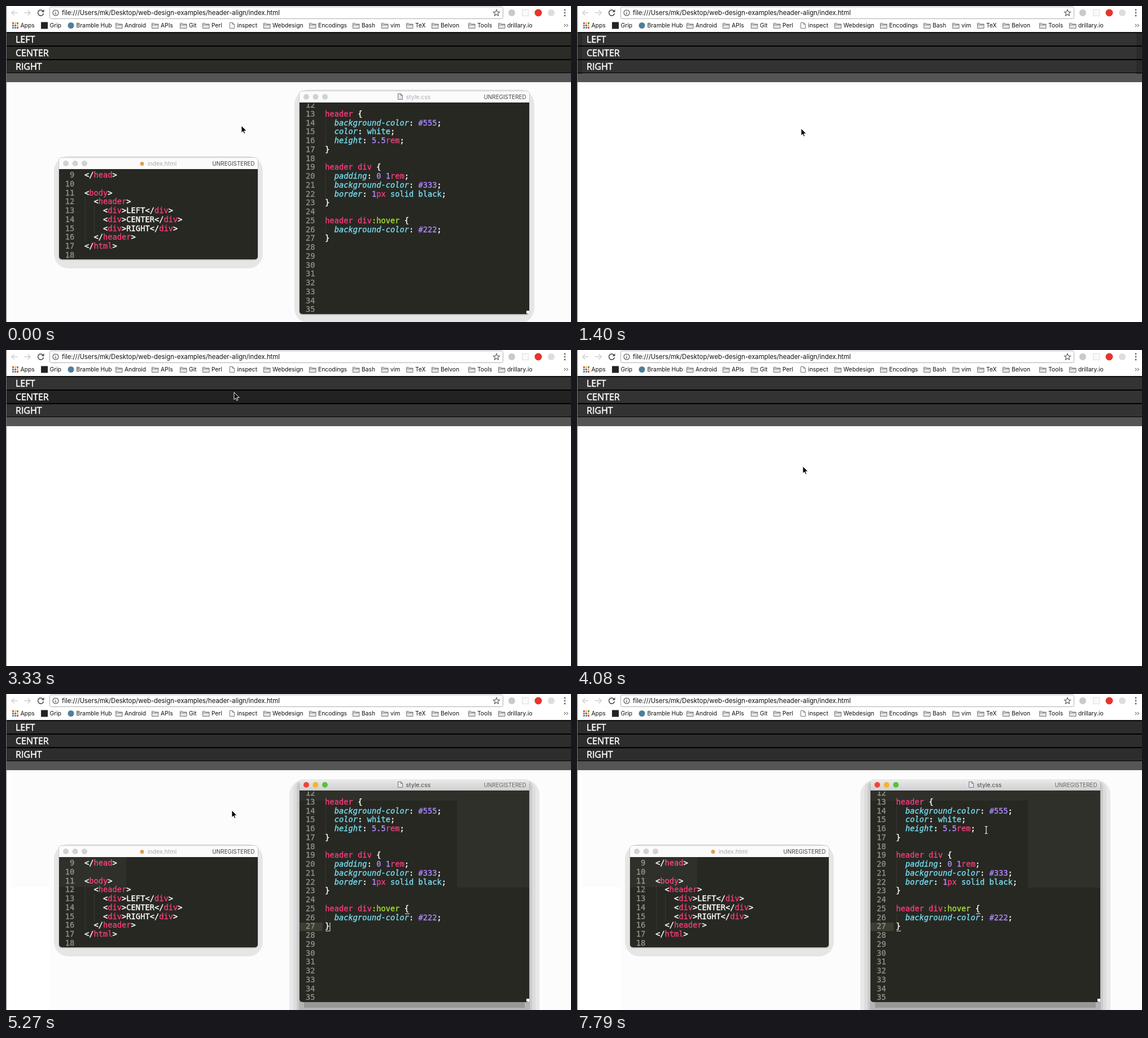
Write an HTML page that moves like this. It is 1001 px wide and 560 px high and loops after 8 s.

```html
<!DOCTYPE html>
<html lang="en">
<head>
<meta charset="utf-8">
<title>Header alignment</title>
<style>
  html, body { margin: 0; width: 100%; height: 100%; overflow: hidden; background: #fff; }
  svg { display: block; width: 1001px; height: 560px; }
  text { white-space: pre; font-family: Inter, Roboto, sans-serif; }
  .row { font: 16px "Open Sans", "Noto Sans", sans-serif; fill: #fff; stroke: #fff; stroke-width: .5px; }
  .code { font: 13.72px "DejaVu Sans Mono", "Liberation Mono", monospace; }
  .code, .code tspan { fill: currentColor; stroke: currentColor; stroke-width: .35px; }
  .n { color: #8f908a; }
  .w { color: #fff; }
  .p { color: #f63c7c; }
  .c, .i { color: #78ddf3; }
  .i { font-style: italic; }
  .v { color: #b08aff; }
  .g { color: #a9e035; }
</style>
</head>
<body>
<svg id="stage" viewBox="0 0 1001 560"></svg>
<script>
const LOOP = 8000, START = 500, STEP = 148.7, PITCH = 15.75;
const HEADER_TOP = 47, ROW = 24;
const WINDOWS_HIDE = 1400, SWITCHER_SHOW = 4680, HAND_SHOW = 5130, WINDOWS_SHOW = 5270;

const rect = (x, y, w, h, fill, more = '') =>
  `<rect x="${x}" y="${y}" width="${w}" height="${h}" fill="${fill}" ${more}/>`;
const dot = (x, y, r, fill) => `<circle cx="${x}" cy="${y}" r="${r}" fill="${fill}"/>`;
const path = (d, fill, stroke = 'none', more = '') =>
  `<path d="${d}" fill="${fill}" stroke="${stroke}" ${more}/>`;
const label = (x, y, size, s, fill = '#111', more = '') =>
  `<text x="${x}" y="${y}" font-size="${size}" fill="${fill}" ${more}>${s}</text>`;
const group = (id, body) => `<g id="${id}">${body}</g>`;

// Browser toolbar and bookmarks
const folder = x => path(`M${x + .5} 30.5h4l1.5 1.5h6v7.500h-11.500z M${x + .5} 33.500h11.500`, '#e4e4e4', '#777');
const page = (x, y, fill = '#fff') => path(`M${x + .5} ${y + .5}h5l3 3v7h-8z M${x + 5.5} ${y + .5}v3h3`, fill, '#777');

function toolbar() {
  const folders = [[194, 'Android'], [258, 'APIs'], [308, 'Git'], [348, 'Perl'], [456, 'Webdesign'],
    [537, 'Encodings'], [614, 'Bash'], [665, 'vim'], [709, 'TeX'], [754, 'Belvon'], [819, 'Tools'], [872, 'drillary.io']];
  const plain = [[25.5, 'Apps'], [77.5, 'Grip'], [124.5, 'Bramble Hub'], [409.5, 'inspect']];
  const colors = ['#e8453c', '#f9bb2d', '#3aa757', '#4688f1'];
  let s = rect(0, 0, 1001, 46, '#fff');
  s += path('M20 12H10M14.500 7.500L10 12l4.500 4.500M32 12h11M38.500 7.500L43 12l-4.500 4.500', 'none', '#d0d0d0', 'stroke-width="1.500"');
  s += path('M65.500 9A5 5 0 1 0 66.500 13', 'none', '#555', 'stroke-width="1.600"') + path('M67.500 6v5h-5z', '#555');
  s += rect(77.500, 1.500, 803, 21, '#fff', 'rx="3" stroke="#b0b0b0"');
  s += path('M93 12a5 5 0 1 0-10 0a5 5 0 1 0 10 0M88 11v4M88 8.500v1.300', 'none', '#555', 'stroke-width="1.200"');
  s += label(99, 16, 11.3, 'file:///Users/mk/Desktop/web-design-examples/header-align/index.html');
  s += path('M869 6.500l1.600 3.700 4 .3-3 2.700.9 3.900-3.500-2.100-3.500 2.100.9-3.900-3-2.700 4-.3z', 'none', '#555', 'stroke-width="1.100"');
  s += dot(896, 12, 6, '#c9c9c9') + rect(914.5, 6.5, 11, 11, '#fafafa', 'stroke="#ddd"');
  s += dot(943, 12, 6.500, '#e5352b') + dot(966, 12, 6, '#ddd');
  s += [7, 12, 17].map(y => dot(990, y, 1.500, '#666')).join('');
  for (let i = 0; i < 9; i++) s += rect(11 + i % 3 * 4, 29 + Math.floor(i / 3) * 4, 3, 3, colors[i % 4]);
  s += rect(62, 28.500, 12, 12, '#222') + dot(115, 34.500, 5.500, '#4d7f9c') + page(396, 29);
  s += plain.map(([x, name]) => label(x, 38, 10.3, name)).join('');
  s += folders.map(([x, name]) => folder(x) + label(x + 16, 38, 10.3, name)).join('');
  return s + path('M989 32l2.500 2.500-2.500 2.500M993 32l2.500 2.500-2.500 2.500', 'none', '#333');
}

function header() {
  const names = ['LEFT', 'CENTER', 'RIGHT'];
  const edge = x => rect(x, HEADER_TOP + 1, 9, 0, '#2b2b2b', 'class="edge"');
  const top = i => HEADER_TOP + i * ROW;
  return rect(1, HEADER_TOP - 1, 1000, 1, '#222') + rect(1, HEADER_TOP, 1000, 88, '#555') +
    names.map((name, i) => rect(1, top(i) + 1, 1000, ROW - 2, '#333', `id="row${i}"`)).join('') +
    edge(0) + edge(991) +
    names.map((name, i) => rect(1, top(i), 1000, 1, '#000') + rect(1, top(i + 1) - 1, 1000, 1, '#000') +
      `<text class="row" x="17" y="${top(i) + 18}">${name}</text>`).join('');
}

// Editor lines: "~k" starts a run of text in colour class k
const html = [
  '~w</~phead~w>', '', '~w<~pbody~w>', '~w  <~pheader~w>',
  ...['LEFT', 'CENTER', 'RIGHT'].map(s => `~w    <~pdiv~w>${s}</~pdiv~w>`),
  '~w  </~pheader~w>', '~w</~phtml~w>', ''];
const css = [
  '', '~pheader ~w{', '~i  background-color~w: ~v#555~w;', '~i  color~w: ~cwhite~w;',
  '~i  height~w: ~v5.5~prem~w;', '~w}', '', '~pheader div ~w{', '~i  padding~w: ~v0 1~prem~w;',
  '~i  background-color~w: ~v#333~w;', '~i  border~w: ~v1~ppx ~csolid black~w;', '~w}', '',
  '~pheader div~g:hover ~w{', '~i  background-color~w: ~v#222~w;', '~w}', ...Array(8).fill('')];

const spans = line => line.split('~').slice(1).map(s =>
  `<tspan class="${s[0]}">${s.slice(1).replace(/</g, '&lt;')}</tspan>`).join('');

const listing = (lines, first, x, y) => lines.map((line, i) => {
  const base = y + i * PITCH;
  return `<text class="code n" x="${x - 34.300}" y="${base}">${String(first + i).padStart(2)}</text>` +
    `<text class="code" x="${x}" y="${base}">${spans(line)}</text>`;
}).join('');

const guide = (x, y, lines) => path(`M${x + .5} ${y}v${lines * PITCH}`, 'none', '#484942', 'stroke-dasharray="1 1"');

function bar(x, y, w, name, nameX, active) {
  const lights = active ? ['#f0443a', '#f5b32e', '#56c13d'] : Array(3).fill('#d2d2d2');
  return path(`M${x} ${y + 20}v-15q0-5 5-5h${w - 10}q5 0 5 5v15z`, active ? 'url(#metal)' : '#fbfbfb') +
    lights.map((c, i) => dot(x + 12 + i * 16.500, y + 10, 5, c)).join('') +
    label(nameX, y + 13.800, 10.5, name, active ? '#444' : '#aaa') +
    label(x + w - 80.500, y + 13.500, 9.9, 'UNREGISTERED', active ? '#666' : '#444');
}

const shade = (x, y, w, h, fill, r) => rect(x, y, w, h, fill, `rx="${r}"`);

// Soft halo of an inactive window
const halo = (x, y, w, h) =>
  shade(x - 9, y - 3, w + 18, h + 19, '#e6e6e6', 26) + shade(x - 1, y - 1, w + 2, h + 3, '#c9c9c9', 6);

const htmlWindow = () =>
  halo(94, 269, 352, 180) + rect(94, 275, 352, 174, '#272822', 'rx="5"') +
  guide(140, 339, 5) + guide(156, 354.500, 3) + listing(html, 9, 139, 304) +
  bar(94, 269, 352, 'index.html', 251, false) + dot(241, 279.500, 3.500, '#e0a052');

function cssWindow() {
  // Each layer: spread to the sides, top, bottom, colour
  const raised = [[18, 152, 600, '#e8e8e8'], [11, 152, 590, '#dcdcdc'], [5, 153, 575, '#cbcbcb'],
    [1, 151, 565, '#b4b4b4'], [-8, 170, 556, '#989898']]
    .map(([d, top, bottom, c]) => shade(520 - d, top, 407 + 2 * d, bottom - top, c, d + 8)).join('');
  return group('calm', halo(520, 151, 407, 395)) + group('raised', raised) +
    rect(520, 160, 407, 386, '#272822', 'rx="5"') +
    group('line', rect(520, 405, 41, 15, '#3e3d32') + rect(707, 389, 8, 1, '#eee') + rect(566, 419.500, 8, 1, '#eee')) +
    guide(566, 200, 3) + guide(566, 294.500, 3) + guide(566, 389, 1) + listing(css, 12, 565.3, 180.2) +
    rect(573.500, 405, 1, 15, '#f8f8f0', 'id="caret"') + rect(922, 540, 5, 5, '#fff') +
    rect(520, 170, 407, 3, '#272822') +
    group('barCalm', bar(520, 151, 407, 'style.css', 708.500, false)) +
    group('barLive', bar(520, 151, 407, 'style.css', 708.500, true)) + page(694, 155, '#dfe5f2');
}

const traces = () => [[520, 171, 407, 18], [799, 189, 128, 154], [94, 289, 119, 53]]
  .map(([x, y, w, h]) => rect(x, y, w, h, '#fff', 'opacity=".035"')).join('');

const switcher = () => rect(213, 189, 586, 154, '#efefef') + shade(449, 209, 113, 113, '#cacaca', 8) +
  dot(285, 266, 48.500, '#dd4b3e') + dot(396, 266, 38, '#e8392f') + shade(457, 219, 98, 92, '#484848', 8) +
  shade(573, 225, 87, 82, '#3f9df5', 3) + shade(682, 227, 90, 79, '#222', 4) +
  label(506, 338, 11.8, 'Plumette Pad 2', '#858585', 'text-anchor="middle"');

const pointers =
  group('arrow', path('M0 0V12.800L2.900 10.100 4.900 14.500 6.900 13.600 5 9.300H9.200Z', '#000', '#fff')) +
  group('hand', path('M-.5 1.500q1.500-2 2.500 .5l1 3q1.500-1 2 .3q1.500-.8 2 .5q1.800-.7 2.200 1.200q.6 3-.7 5.500v2h-6.500l-4-5q-1.500-2 .8-2l1.500 1z', '#fff', '#000')) +
  group('beam', path('M-2.500-6.500q2.500 0 2.500 1.500V5q0 1.500-2.500 1.500M2.500-6.500Q0-6.500 0-5V5q0 1.500 2.500 1.500', 'none', '#eee', 'stroke-width="1.200"'));

stage.innerHTML =
  '<defs><linearGradient id="metal" x2="0" y2="1"><stop stop-color="#ebebeb"/><stop offset="1" stop-color="#cfcfcf"/></linearGradient></defs>' +
  rect(0, 0, 1001, 560, '#fff') +
  group('tint', rect(9, 134, 992, 208, '#fcfcfc') + rect(78, 342, 923, 218, '#fcfcfc')) +
  rect(1, 134, 1000, 426, '#fcfcfc', 'id="wash"') +
  toolbar() + header() +
  group('windows', htmlWindow() + cssWindow() + group('traces', traces())) +
  group('switcher', switcher()) + rect(0, 0, 1, 560, '#777') + group('pointer', pointers);

// Pointer path: step index, x, y
const moves = [[-1, 417, 212], [4, 397, 217], [8, 397, 217], [12, 405, 102], [13, 407, 74], [14, 408, 54],
  [15, 407, 52], [16, 404, 72], [19, 404, 75], [21, 403, 90], [22, 402, 112], [24, 400, 206],
  [39, 400, 206], [41, 425, 214], [43, 545, 234], [45, 676, 241], [49, 725, 241]];

function pointerAt(k) {
  const i = moves.findIndex(m => m[0] >= k);
  if (i < 1) return moves[i < 0 ? moves.length - 1 : 0].slice(1);
  const [a, b] = [moves[i - 1], moves[i]], f = (k - a[0]) / (b[0] - a[0]);
  return [1, 2].map(j => Math.round(a[j] + (b[j] - a[j]) * f));
}

const el = id => document.getElementById(id);
const show = (id, on) => el(id).style.display = on ? '' : 'none';

function draw() {
  const t = performance.now() % LOOP;
  const step = Math.max(-1, Math.floor((t - START) / STEP));
  const [x, y] = pointerAt(step);
  const before = t < WINDOWS_HIDE, live = t >= WINDOWS_SHOW;
  const hand = t >= HAND_SHOW && !live, beam = x > 520;

  show('windows', before || live);
  show('wash', before);
  for (const id of ['calm', 'barCalm']) show(id, before);
  for (const id of ['raised', 'barLive', 'line', 'traces', 'tint']) show(id, live);
  show('caret', live && t % 1000 < 550);
  show('switcher', t >= SWITCHER_SHOW && !live);

  const base = before ? '#2b2c28' : live ? '#2d2d2d' : '#333';
  const hover = Math.floor((y - HEADER_TOP) / ROW);
  for (let i = 0; i < 3; i++) el('row' + i).setAttribute('fill', i === hover ? '#222' : base);

  // Row ends stay dim until the pointer has climbed past them
  const dimRows = before || live ? 0 : Math.min(3, Math.max(0, 14 - step));
  document.querySelectorAll('.edge').forEach(e => e.setAttribute('height', dimRows * ROW));

  show('arrow', !hand && !beam);
  show('hand', hand);
  show('beam', beam);
  el('pointer').setAttribute('transform', `translate(${x} ${y})`);
  requestAnimationFrame(draw);
}
draw();
</script>
</body>
</html>
```
